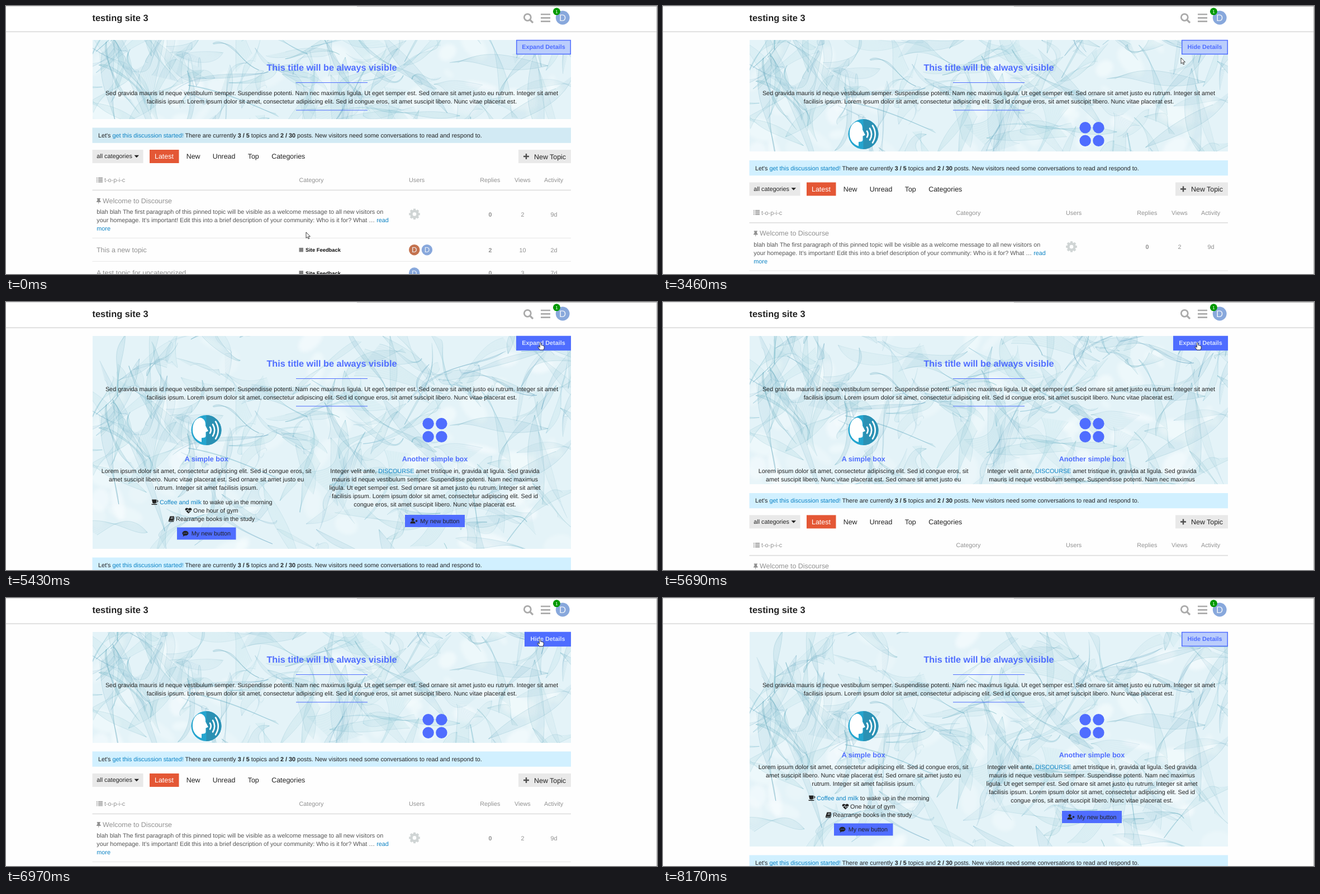
An HTML page with a canvas that plays this animation: 1165x481 px, repeating every 8790 ms.

```html
<!DOCTYPE html>
<html lang="en">
<head>
<meta charset="utf-8">
<title>Expanding banner</title>
<style>
  html, body { margin: 0; width: 1165px; height: 481px; overflow: hidden; background: #fefefe; }
  #banner { position: absolute; left: 154.5px; top: 60.8px; width: 856.5px; overflow: hidden; }
  canvas { position: absolute; left: 0; }
  svg { position: absolute; left: 0; top: 0; }
  text { font-family: "Liberation Sans", Arial, sans-serif; text-rendering: geometricPrecision; white-space: pre; }
</style>
</head>
<body>
<div id="banner"><canvas width="857" height="386"></canvas></div>
<svg id="stage" width="1165" height="481" viewBox="0 0 1165 481"></svg>
<script>
const LOOP = 8790, SLIDE = 600, CLOSED = 142, GROW = 243, TOP = 60.8;
const BLUE = '#4f6dff', LINK = '#0a82c4', GREY = '#919191', INK = '#222';
const BODY = 10.81, LARGE = 12.43, LEAD = 15.13;
const $ = id => document.getElementById(id);

// ---- markup helpers ----
const text = (x, y, str, { size = BODY, fill = INK, bold, mid } = {}) =>
  `<text x="${x}" y="${y}" font-size="${size}" fill="${fill}"${bold ? ' font-weight="700"' : ''}${mid ? ' text-anchor="middle"' : ''}>${str}</text>`;
const lines = (x, y, list, opt) => list.map((s, i) => text(x, y + i * LEAD, s, opt)).join('');
const rect = (x, y, w, h, fill, more = '') =>
  `<rect x="${x}" y="${y}" width="${w}" height="${h}" fill="${fill}" ${more}/>`;
const disc = (x, y, r, fill) => `<circle cx="${x}" cy="${y}" r="${r}" fill="${fill}"/>`;
const path = (d, fill, more = '') => `<path d="${d}" fill="${fill}" ${more}/>`;
const line = (d, stroke, w, more = '') => path(d, 'none', `stroke="${stroke}" stroke-width="${w}" ${more}`);
const at = (x, y, body) => `<g transform="translate(${x} ${y})">${body}</g>`;
const link = s => `<tspan fill="${LINK}">${s}</tspan>`;
const strong = s => `<tspan font-weight="700">${s}</tspan>`;
const avatar = (x, y, r, fill) => disc(x, y, r, fill) +
  text(x, y + r * .48, 'D', { size: r * 1.36, fill: '#eef2f8', mid: 1 });

// ---- page parts ----
const header = () =>
  rect(0, 0, 1165, 45.5, '#fff') + rect(0, 45.5, 1165, 1.5, '#d8d8d8') +
  rect(0, 0, 628, 1, '#d8d8d8') + rect(628, 0, 537, 1, '#a8a8a8') + rect(1164, 0, 1, 481, '#b4b4b4') +
  text(154.5, 27.4, 'testing site 3', { size: 16.36, bold: 1 }) +
  `<circle cx="933.3" cy="20.300" r="6" fill="none" stroke="#aaa" stroke-width="2.8"/>` +
  line('M937.8 24.900L943 30.100', '#aaa', 3.4) +
  line('M957 15H974M957 21.3H974M957 27.6H974', '#aaa', 2.7) +
  avatar(996.2, 21, 12.4, '#88a8dc') + disc(985.4, 9.8, 6.5, '#090') +
  text(985.4, 12.6, '1', { size: 8, fill: '#fff', mid: 1 });

const speaker = () =>
  disc(358.5, 230, 27, '#24a5cf') + path('M358.5 203A27 27 0 0 1 358.5 257Z', '#2b91b4') +
  path('M347 207.500C355 208.500 357.500 215 357 222L362 231.500L357.500 233.500V240C357.500 244 353 243.500 350 244V251.500C341 248.500 334.500 241 334 231C333.500 219 338 210 347 207.500Z', '#fff') +
  line('M365 224.500Q368.500 230 365 235.500M370 219.500Q376.500 230 370 240.500M375 214.500Q384.500 230 375 245.500', '#fff', 2.6, 'stroke-linecap="round"');

const cup = path('M0 0H8V1H9.500Q11.500 1 11.500 3T9 5H8Q7.500 7 6 7H3Q1 7 1 5ZM8 2V4H9Q10.300 4 10.300 3T9 2ZM-1 8H10Q9 9.500 8 9.500H1Q-.5 9.500-1 8Z', INK, 'fill-rule="evenodd"');
const heart = path('M6 10L.8 5Q-1 2 1.500.5Q4-1 6 1.500Q8-1 10.500.5Q13 2 11.200 5Z', INK) +
  line('M0 4.800H3.500L5 2.500L6.800 7L8 4.800H12', '#e4f2f7', 1);
const book = path('M2.500 0H10L8.300 8H1.500Q.8 8 1 8.800H8.500L10 2L10.500 3L9 10H1Q-.7 9.500 0 7.500Z', INK) +
  line('M4 2.300H8M3.500 4.200H7.500', '#e4f2f7', .8);
const chat = `<ellipse cx="5.500" cy="4.500" rx="5.500" ry="4.300" fill="${INK}"/>` + path('M2 7L1 10.500L5.500 8Z', INK) +
  [3, 5.5, 8].map(x => disc(x, 4.5, .8, BLUE)).join('');
const person = disc(4.5, 2.5, 2.5, INK) + path('M0 9.500V8Q.5 5.500 3 5.500H6Q8.500 5.500 9 8V9.500Z', INK) +
  line('M9 5H13M11 3V7', INK, 1.4);

const button = (x, y, w, icon) => rect(x, y, w, 22, BLUE) +
  at(x + 9.5, y + 6, icon) + text(x + w - 79.7, y + 14.8, 'My new button');

const bannerBody = () => {
  const mid = { mid: 1 }, head = { size: 12.6, fill: BLUE, bold: 1, mid: 1 };
  return text(583, 115.8, 'This title will be always visible', { size: 16.2, fill: BLUE, bold: 1, mid: 1 }) +
    rect(519, 137, 128, 1, BLUE) + rect(519, 186.5, 128, 1, BLUE) +
    lines(583, 160, [
      'Sed gravida mauris id neque vestibulum semper. Suspendisse potenti. Nam nec maximus ligula. Ut eget semper est. Sed ornare sit amet justo eu rutrum. Integer sit amet',
      'facilisis ipsum. Lorem ipsum dolor sit amet, consectetur adipiscing elit. Sed id congue eros, sit amet suscipit libero. Nunc vitae placerat est.'
    ], mid) +
    speaker() +
    [755.6, 779.4].map(x => disc(x, 218.2, 10.2, BLUE) + disc(x, 241.8, 10.2, BLUE)).join('') +
    text(358.7, 285.7, 'A simple box', head) +
    lines(358.7, 306.6, [
      'Lorem ipsum dolor sit amet, consectetur adipiscing elit. Sed id congue eros, sit',
      'amet suscipit libero. Nunc vitae placerat est. Sed ornare sit amet justo eu',
      'rutrum. Integer sit amet facilisis ipsum.'
    ], mid) +
    at(261, 354.5, cup) + text(275, 362.8, link('Coffee and milk') + ' to wake up in the morning') +
    at(320.5, 369.5, heart) + text(335, 378.3, 'One hour of gym') +
    at(291, 384.5, book) + text(304, 393.2, 'Rearrange books in the study') +
    button(306, 404.5, 105.5, chat) +
    text(767.5, 285.7, 'Another simple box', head) +
    lines(767.6, 306.6, [
      `Integer velit ante, ${link('DISCOURSE')} amet tristique in, gravida at ligula. Sed gravida`,
      'mauris id neque vestibulum semper. Suspendisse potenti. Nam nec maximus',
      'ligula. Ut eget semper est. Sed ornare sit amet justo eu rutrum. Integer sit amet',
      'facilisis ipsum. Lorem ipsum dolor sit amet, consectetur adipiscing elit. Sed id',
      'congue eros, sit amet suscipit libero. Nunc vitae placerat est.'
    ], mid) +
    button(714, 382, 107, person);
};

const counts = (y, replies, views, age) =>
  text(866.5, y, replies, { bold: 1, fill: GREY, mid: 1 }) +
  text(924.5, y, views, { fill: GREY, mid: 1 }) + text(980.5, y, age, { fill: GREY, mid: 1 });

const topic = (y, title, users, ...nums) =>
  text(162, y + 4.4, title, { size: LARGE, fill: GREY }) +
  rect(524.5, y - 3.8, 7.5, 7.5, '#808080') +
  text(536, y + 3.7, 'Site Feedback', { size: 9.37, bold: 1, fill: '#111' }) +
  users.map((c, i) => avatar(730.7 + i * 22.7, y, 9.7, c)).join('') + counts(y + 3.8, ...nums);

const gear = () => line(Array.from({ length: 8 }, (_, i) => {
  const a = i * Math.PI / 4, c = Math.cos(a), s = Math.sin(a);
  return `M${731 + 6 * c} ${373.5 + 6 * s}L${731 + 9.8 * c} ${373.5 + 9.8 * s}`;
}).join(''), '#d0d5d5', 4) + '<circle cx="731" cy="373.500" r="5.600" fill="none" stroke="#d0d5d5" stroke-width="4.500"/>';

const list = () => {
  const soft = { fill: GREY };
  return rect(154.5, 218.5, 856.5, 27.3, '#d1f0ff', 'id="notice"') +
    text(165, 236, `Let's ${link('get this discussion started!')} There are currently ${strong('3 / 5')} topics and ${strong('2 / 30')} posts. New visitors need some conversations to read and respond to.`) +
    rect(154.5, 258, 91, 24, '#e9e9e9') + text(162.3, 273.4, 'all categories') + path('M229.500 267.800H238L233.700 272.200Z', INK) +
    rect(257, 258, 52.5, 24, '#e45735') + text(266, 274.2, 'Latest', { size: LARGE, fill: '#fff' }) +
    [[322.7, 'New'], [369.7, 'Unread'], [432.7, 'Top'], [475.2, 'Categories']]
      .map(([x, s]) => text(x, 274.2, s, { size: LARGE })).join('') +
    rect(917, 258, 94, 24, '#e9e9e9') + line('M926 270H936M931 265V275', '#505050', 2.4) +
    text(945, 274.6, 'New Topic', { size: LARGE }) +
    line('M162 308.500H163.600M162 310.900H163.600M162 313.300H163.600M162 315.700H163.600M165 308.500H173M165 310.900H173M165 313.300H173M165 315.700H173', GREY, 1.4) +
    [[176, 't-o-p-i-c'], [524.5, 'Category'], [721, 'Users'], [848.3, 'Replies'], [910, 'Views'], [963, 'Activity']]
      .map(([x, s]) => text(x, 316, s, soft)).join('') +
    rect(154.5, 329.5, 856.5, 2, '#e3e3e3') +
    path('M162.800 345H168.800V346.500H168V349L169.700 351V352H166.500L165.800 356L165.100 352H162V351L163.600 349V346.500H162.800Z', GREY) +
    text(173, 353.6, 'Welcome to Discourse', { size: LARGE, fill: GREY }) +
    lines(162.3, 373, [
      'blah blah The first paragraph of this pinned topic will be visible as a welcome message to all new visitors on',
      `your homepage. It’s important! Edit this into a brief description of your community: Who is it for? What … ${link('read')}`,
      link('more')
    ], { fill: '#555' }) +
    gear() + counts(377.6, '0', '2', '9d') +
    rect(154.5, 416, 856.5, 1, '#e6e6e6') +
    topic(437.7, 'This a new topic', ['#c4734f', '#88a8dc'], '2', '10', '2d') +
    rect(154.5, 457.8, 856.5, 1, '#e6e6e6') +
    topic(479, 'A test topic for uncategorized', ['#88a8dc'], '0', '3', '7d');
};

const pointer = 'fill="#fff" stroke="#111" stroke-width=".8" stroke-linejoin="round"';
$('stage').innerHTML =
  `<clipPath id="clip">${rect(154.5, TOP, 856.5, CLOSED, '#000', 'id="window"')}</clipPath>` +
  header() + `<g clip-path="url(#clip)">${bannerBody()}</g><g id="list">${list()}</g>` +
  `<rect id="toggle" y="61.500" height="24.900" stroke="${BLUE}" stroke-width="1.500"/>` +
  text(0, 77.2, '', { bold: 1, mid: 1 }).replace('<text', '<text id="label"') +
  `<g id="cursor"><path id="arrow" d="M0 0V10.500L2.400 8.300L4.100 12L5.700 11.300L4.200 7.700H7.400Z" ${pointer}/>` +
  `<path id="hand" d="M-1.200.8Q0-.8 1.200.8V4.500Q2.500 3.900 3.200 5Q4.500 4.500 5 5.500Q6.600 5.400 6.600 7V10L5.500 13H-1L-3.800 9Q-5 7-3.500 6.800L-1.200 8.500Z" ${pointer}/></g>`;

// ---- smoky banner texture ----
function paintTexture(canvas) {
  const c = canvas.getContext('2d'), W = canvas.width, H = canvas.height;
  let seed = 77;
  const rnd = (a = 0, b = 1) => {
    seed = (seed * 1664525 + 1013904223) >>> 0;
    return a + (b - a) * seed / 4294967296;
  };
  const ink = alpha => `rgba(82,156,178,${alpha})`;
  c.fillStyle = '#e4f3f8';
  c.fillRect(0, 0, W, H);
  // soft pale patches
  c.filter = 'blur(3px)';
  for (let i = 0; i < 70; i++) {
    c.fillStyle = `rgba(250,254,255,${rnd(.2, .6)})`;
    c.beginPath();
    c.ellipse(rnd(0, W), rnd(0, H), rnd(8, 34), rnd(5, 20), rnd(0, 3), 0, 7);
    c.fill();
  }
  c.filter = 'none';
  // veils: thin sheets with fine folds, denser along a band above the middle
  for (let i = 0; i < 190; i++) {
    const x = rnd(-30, W + 30), y = i % 3 ? rnd(-20, H + 20) : 130 + rnd(-60, 60);
    const dir = rnd(0, Math.PI * 2), len = rnd(50, 160), tone = rnd(.5, 1);
    const edge = spread => [0, .35, .7, 1].map(f => [
      x + Math.cos(dir) * len * f + rnd(-spread, spread),
      y + Math.sin(dir) * len * f + rnd(-spread, spread)]);
    const a = edge(24), b = edge(34), n = 9;
    a[0] = b[0];
    const fold = k => a.map((q, j) => q.map((v, m) => v + (b[j][m] - v) * k / n)).flat();
    const [, , p, q, r, s, u, v] = fold(n);
    c.beginPath();
    c.moveTo(...a[0]);
    c.bezierCurveTo(...fold(0).slice(2));
    c.lineTo(u, v);
    c.bezierCurveTo(r, s, p, q, ...a[0]);
    c.fillStyle = ink(.07 * tone);
    c.fill();
    for (let k = 0; k <= n; k++) {
      c.beginPath();
      c.moveTo(...a[0]);
      c.bezierCurveTo(...fold(k).slice(2));
      c.strokeStyle = ink((k % n ? .07 : .3) * tone);
      c.lineWidth = .8;
      c.stroke();
    }
  }
}

// ---- timeline ----
// bursts of picture changes: first, last, count
const bursts = [[0, 0, 1], [910, 1030, 2], [1180, 1540, 4], [1680, 1680, 1], [1820, 1940, 2], [2090, 2570, 5],
  [3220, 4060, 8], [4180, 5020, 8], [5280, 5280, 1], [5430, 5810, 4], [5960, 6080, 2], [6580, 6700, 2],
  [6850, 7690, 8], [7810, 8170, 4]];
// pointer path: time, x, y
const track = [[0, 537, 406], [910, 540, 405], [1030, 545, 405], [1180, 565, 428], [1300, 650, 447], [1420, 790, 418],
  [1540, 883, 355], [1680, 919, 219], [1820, 910, 175], [1940, 898, 140], [2090, 905, 95], [2210, 919, 62],
  [2570, 927, 80], [3220, 927, 84], [3460, 927, 93], [4060, 948, 191], [4180, 951, 190], [4540, 960, 125],
  [5020, 955, 66], [5280, 956, 66], [5430, 956.5, 73], [6080, 956.5, 73], [6580, 955, 70], [6700, 955, 73.500],
  [7210, 956, 74], [7450, 963, 96], [7690, 991, 155], [7810, 1020, 215], [8050, 1117, 453]];

const hold = t => {
  const [a, b, n] = bursts.filter(s => s[0] <= t).pop();
  if (n < 2) return a;
  const step = (b - a) / (n - 1);
  return a + Math.min(n - 1, Math.floor((t - a) / step + 1e-6)) * step;
};
const swing = (t, start) =>
  .5 - Math.cos(Math.PI * Math.min(1, Math.max(0, (t - start) / SLIDE))) / 2;
const place = t => {
  const i = track.findLastIndex(k => k[0] <= t), a = track[i], b = track[i + 1] || a;
  const f = b === a ? 0 : (t - a[0]) / (b[0] - a[0]);
  return [a[1] + (b[1] - a[1]) * f, a[2] + (b[2] - a[2]) * f];
};
const set = (id, attrs) => { for (const k in attrs) $(id).setAttribute(k, attrs[k]); };

const canvas = document.querySelector('canvas');
const OPEN = 3264, CLOSE = 5388, REOPEN = 6777;

function draw(time) {
  const t = hold(time);
  const grown = GROW * (swing(t, OPEN) - swing(t, CLOSE) + swing(t, REOPEN));
  const height = CLOSED + grown;
  $('banner').style.height = height + 'px';
  canvas.style.top = (height - canvas.height) / 2 + 'px';
  set('window', { height });
  set('list', { transform: `translate(0 ${grown})` });
  set('notice', { fill: t < OPEN ? '#d2eaf4' : '#d1f0ff' });

  const open = (t >= OPEN && t < CLOSE) || t >= REOPEN;
  const left = open ? 928.700 : 913.700, [x, y] = place(t);
  const hover = x >= left && x < 1011 && y > 61 && y < 87;
  set('toggle', { x: left, width: 1010.300 - left, fill: hover ? BLUE : '#bacdfc' });
  set('label', { x: (left + 1010.300) / 2, fill: hover ? '#d6e2ff' : BLUE });
  $('label').textContent = open ? 'Hide Details' : 'Expand Details';

  const hand = hover && t > 2210;
  set('cursor', { transform: `translate(${x} ${y})`, visibility: t < 8170 ? 'visible' : 'hidden' });
  set('hand', { display: hand ? 'inline' : 'none' });
  set('arrow', { display: hand ? 'none' : 'inline' });
}

paintTexture(canvas);
draw(0);
const begin = performance.now();
(function tick() {
  draw((performance.now() - begin) % LOOP);
  requestAnimationFrame(tick);
})();
</script>
</body>
</html>
```
